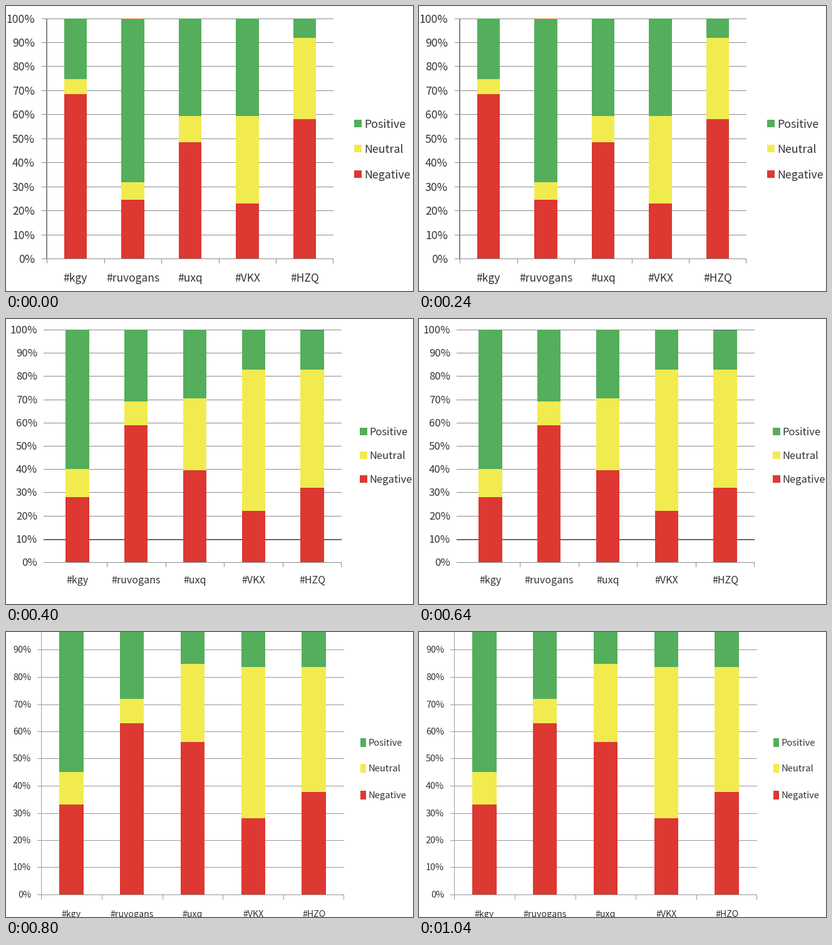
These frames come from a looping animation (650x456 px, 1.2 s). A matplotlib script:

```python
import matplotlib.pyplot as plt
from matplotlib.animation import FuncAnimation
from matplotlib.patches import Rectangle

W, H, DPI = 650, 456, 64
FONT = "Noto Sans CJK JP"
RED, YELLOW, GREEN = "#dd3832", "#f2eb50", "#54ae5c"
INK = "#333333"
TAGS = ["#kgy", "#ruvogans", "#uxq", "#VKX", "#HZQ"]
KEYS = [("Positive", GREEN), ("Neutral", YELLOW), ("Negative", RED)]

# Each share pair: top of the red part, top of the yellow part, in percent.
CHARTS = [
    dict(left=65, right=523, tick=57, base=404, step=38.45, bar=36.5,
         shares=[(68.3, 74.7), (24.5, 31.8), (48.5, 59.2), (23, 59.2), (58, 91.9)],
         cap=(1, "#e58a3c"), axis=(2, "#868686"), grid="#8c8c8c", dark=None,
         label_x=46, label_size=17.7, tag_y=441, tag_size=17.4,
         key_x=556, key_w=12, key_h=12, key_ys=(188, 228, 269),
         text_x=572, text_size=17.9),
    dict(left=67, right=536, tick=60, base=389, step=37.2, bar=37.5,
         shares=[(28, 40), (59, 69), (39.5, 70.5), (22, 82.8), (32, 82.8)],
         cap=(4, "#6f58a0"), axis=None, grid="#8c8c8c", dark=1,
         label_x=50, label_size=16.8, tag_y=423, tag_size=16,
         key_x=565, key_w=12, key_h=12, key_ys=(180, 218, 256),
         text_x=580, text_size=16.5),
    dict(left=56, right=540, tick=50, base=420, step=43.5, bar=38.5,
         shares=[(33, 45), (63, 72), (56.1, 84.9), (28, 83.7), (37.6, 83.7)],
         cap=None, axis=(1, "#a0a0a0"), grid="#989898", dark=None,
         label_x=40, label_size=14.4, tag_y=456, tag_size=14.2,
         key_x=566, key_w=9, key_h=14, key_ys=(177, 218, 261),
         text_x=579, text_size=14.7),
]

fig = plt.figure(figsize=(W / DPI, H / DPI), dpi=DPI, facecolor="white")
ax = fig.add_axes([0, 0, 1, 1])


def box(x0, y0, x1, y1, color):
    x0, y0, x1, y1 = (round(v) for v in (x0, y0, x1, y1))
    ax.add_patch(Rectangle((x0, y0), x1 - x0, y1 - y0, facecolor=color,
                           linewidth=0, antialiased=False))


def label(x, y, text, size, align):
    ax.text(x, y, text, family=FONT, fontsize=size * 72 / DPI,
            color=INK, ha=align, va="baseline")


def draw_grid(c):
    for i in range(11):
        y = round(c["base"] - i * c["step"])
        color = "#6c6872" if i == c["dark"] else c["grid"]
        box(c["tick"], y, c["right"], y + (2 if i == c["dark"] else 1), color)
        if y > 0:
            size = c["label_size"]
            label(c["label_x"], y + 0.37 * size, f"{10 * i}%", size, "right")
    if c["axis"]:
        width, color = c["axis"]
        box(c["left"] - width // 2, c["base"] - 10 * c["step"],
            c["left"] - width // 2 + width, c["base"] + 1, color)


def draw_bars(c):
    slot = (c["right"] - c["left"]) / 5
    unit = c["step"] / 10
    for i, (red, yellow) in enumerate(c["shares"]):
        mid = c["left"] + (i + 0.5) * slot
        x0, x1 = mid - c["bar"] / 2, mid + c["bar"] / 2
        low = 0
        for high, color in ((red, RED), (yellow, YELLOW), (100, GREEN)):
            box(x0, c["base"] - high * unit, x1, c["base"] - low * unit, color)
            low = high
        if c["cap"] and c["cap"][0] == i:
            top = round(c["base"] - 100 * unit)
            box(x0, top, x1, top + 1, c["cap"][1])
        label(mid, c["tag_y"], TAGS[i], c["tag_size"], "center")
    first = 0 if c["axis"] else 1
    for i in range(first, 6):
        x = round(c["left"] + i * slot) - (i == 5)
        box(x, c["base"], x + 1, c["base"] + 8, c["grid"])


def draw_keys(c):
    for (name, color), y in zip(KEYS, c["key_ys"]):
        half = c["key_h"] / 2
        box(c["key_x"], y - half, c["key_x"] + c["key_w"], y + half, color)
        size = c["text_size"]
        label(c["text_x"], y + 0.37 * size, name, size, "left")


def draw(i):
    ax.clear()
    ax.set_xlim(0, W)
    ax.set_ylim(H, 0)
    ax.axis("off")
    c = CHARTS[i % len(CHARTS)]
    draw_grid(c)
    draw_bars(c)
    draw_keys(c)
    return []


anim = FuncAnimation(fig, draw, frames=len(CHARTS), interval=400,
                     init_func=lambda: draw(0), repeat=True, repeat_delay=0,
                     blit=False)
plt.show()
```
